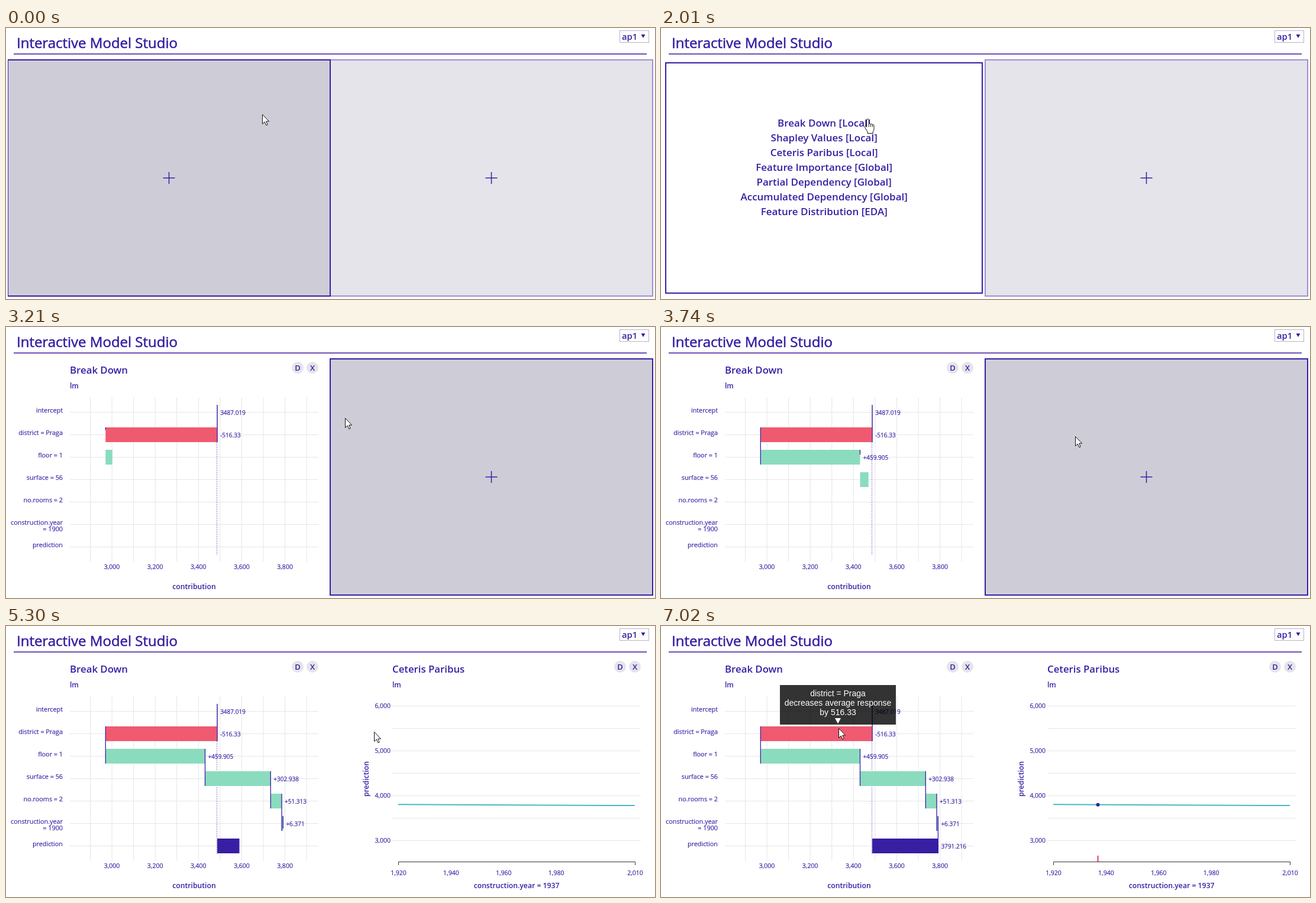
Recreate the animation shown at these times as an HTML page. Size 1097 by 459 pixels, loop 8 s.

```html
<!DOCTYPE html>
<html lang="en">
<head>
<meta charset="utf-8">
<title>Interactive Model Studio</title>
<style>
  html, body { margin: 0; width: 100%; height: 100%; overflow: hidden; background: #fff; }
  svg { display: block; width: 1097px; height: 459px; }
  text { font-family: "Open Sans", "Noto Sans", sans-serif; fill: #371ea3; white-space: pre; }
  .head { font-size: 24px; font-weight: 400; stroke: #371ea3; stroke-width: .55px; }
  .menu { font-size: 17px; font-weight: 600; text-anchor: middle; }
  .title { font-size: 16.8px; font-weight: 600; }
  .sub { font-size: 12px; font-weight: 600; }
  .axis { font-size: 12.2px; font-weight: 600; text-anchor: middle; }
  .btn { font-size: 13px; font-weight: 600; text-anchor: middle; }
  .select { font-size: 14.8px; font-weight: 600; }
  .label, .value, .tick { stroke: #371ea3; stroke-width: .15px; }
  .label { font-size: 10.8px; text-anchor: end; }
  .value { font-size: 10px; }
  .tick { font-size: 10.5px; text-anchor: middle; }
  .ytick { text-anchor: end; }
  .tip { font: 14px "Liberation Sans", Arial, sans-serif; fill: #fff; text-anchor: middle; }
</style>
</head>
<body>
<svg id="stage" viewBox="0 0 1097 459"></svg>
<script>
const LOOP = 8000, STEP = 500, BARS_AT = 2082;
const INK = '#371ea3', GREEN = '#8bdcbe', RED = '#f05a71', GRID = '#e6e6e8';
const stage = document.getElementById('stage');

function add(parent, tag, attrs = {}, text) {
  const el = document.createElementNS('http://www.w3.org/2000/svg', tag);
  for (const k in attrs) el.setAttribute(k, attrs[k]);
  if (text !== undefined) el.textContent = text;
  parent.appendChild(el);
  return el;
}
const set = (el, attrs) => { for (const k in attrs) el.setAttribute(k, attrs[k]); };
const show = (el, on) => { el.style.display = on ? '' : 'none'; };
const group = (parent = stage) => add(parent, 'g');
const label = (g, cls, x, y, s) => add(g, 'text', { class: cls, x, y }, s);
const line = (g, x1, y1, x2, y2, stroke, w = 1) =>
  add(g, 'line', { x1, y1, x2, y2, stroke, 'stroke-width': w });
const box = (g, x, y, width, height, fill, stroke = 'none') =>
  add(g, 'rect', { x, y, width, height, fill, stroke, 'stroke-width': 2 });

const clamp = v => Math.max(0, Math.min(1, v));
const cubic = v => (v = clamp(v)) < .5 ? 4 * v ** 3 : 1 - 4 * (1 - v) ** 3;
const smooth = v => v * v * (3 - 2 * v);

// Header
label(stage, 'head', 18, 34, 'Interactive Model Studio');
line(stage, 13, 44, 1083, 44, '#6e50b2', 2);
add(stage, 'rect', { x: 1037.5, y: 4.5, width: 49, height: 20, fill: '#fff', stroke: '#b9b3c6' });
label(stage, 'select', 1041, 20, 'ap1');
add(stage, 'path', { d: 'M1073.5 11h7l-3.5 6z', fill: INK });

// Empty panels
function emptyPanel(x, width) {
  const g = group();
  const rect = box(g, x, 54, width, 400);
  const cx = x + width / 2;
  line(g, cx - 10, 254, cx + 10, 254, INK, 1.5);
  line(g, cx, 244, cx, 264, INK, 1.5);
  return { g, hover: on => set(rect, { fill: on ? '#cecdd7' : '#e4e4ea', stroke: on ? INK : '#9c8fd2' }) };
}
const rightEmpty = emptyPanel(548, 545);
const leftEmpty = emptyPanel(3, 545);
add(add(stage, 'clipPath', { id: 'edge' }), 'rect', { x: 3, y: 50, width: 550, height: 409 });
set(leftEmpty.g, { 'clip-path': 'url(#edge)' });
leftEmpty.hover(true);

// Plot menus
const plots = ['Break Down [Local]', 'Shapley Values [Local]', 'Ceteris Paribus [Local]',
  'Feature Importance [Global]', 'Partial Dependency [Global]',
  'Accumulated Dependency [Global]', 'Feature Distribution [EDA]'];

function menu(x, y, items) {
  const g = group();
  box(g, x, 59, 535, 390, '#fff', INK);
  items.forEach((s, i) => label(g, 'menu', x + 267.7, y + 25 * i, s));
  return g;
}
const leftMenu = menu(8, 167, plots);
const rightMenu = menu(553, 179, plots.slice(1));

function chart(x, title) {
  const g = group();
  label(g, 'title', x, 79, title);
  label(g, 'sub', x, 104, 'lm');
  [['D', 385], ['X', 410]].forEach(([s, dx]) => {
    add(g, 'circle', { cx: x + dx, cy: 69, r: 10, fill: '#e4e4ea' });
    label(g, 'btn', x + dx, 73.8, s);
  });
  return g;
}

// Break Down chart
const breakDown = chart(108, 'Break Down');
const scaleX = v => 179 + (v - 3000) * .36575;
const rowY = i => 132 + 38 * i;
for (let i = 0; i < 11; i++) {
  const x = 142.5 + 36.57 * i;
  line(breakDown, x, 119, x, 398, GRID);
}
const rows = [
  ['intercept', 3487.019, 3487.019, '3487.019'],
  ['district = Praga', 3487.019, 2970.689, '-516.33'],
  ['floor = 1', 2970.689, 3430.594, '+459.905'],
  ['surface = 56', 3430.594, 3733.532, '+302.938'],
  ['no.rooms = 2', 3733.532, 3784.845, '+51.313'],
  ['construction.year', 3784.845, 3791.216, '+6.371'],
  ['prediction', 3487.019, 3791.216, '3791.216']
];
rows.forEach(([name], i) => {
  line(breakDown, 108, rowY(i) + 12.5, 528, rowY(i) + 12.5, GRID);
  label(breakDown, 'label', 96, rowY(i) + 13, name);
});
label(breakDown, 'label', 96, 346, '= 1900');
for (let v = 3000; v <= 3800; v += 200)
  label(breakDown, 'tick', scaleX(v), 410, v.toLocaleString('en-US'));
label(breakDown, 'axis', 318, 444, 'contribution');
set(line(breakDown, 356.5, 132, 356.5, 385, INK), { 'stroke-dasharray': '1 2' });

const bars = rows.map(([, from, to, text], i) => {
  const a = scaleX(from), b = scaleX(to), y = rowY(i);
  const fill = i === 6 ? INK : b < a ? RED : GREEN;
  return {
    a, b, y,
    rect: box(breakDown, a, y, 0, 25, fill),
    link: i < 6 && line(breakDown, b, y, b, y, INK, 1.3),
    value: label(breakDown, 'value', Math.max(a, b) + 5, y + 17, text)
  };
});
// Connectors sit above every bar.
bars.forEach(({ link }) => link && breakDown.appendChild(link));

function drawBars(t) {
  bars.forEach(({ a, b, y, rect, link, value }, i) => {
    const at = (t - BARS_AT) / STEP - i;
    const end = a + (b - a) * cubic(at);
    set(rect, { x: Math.min(a, end), width: Math.abs(end - a) });
    if (link) {
      show(link, at > 1);
      set(link, { y2: y + 63 * cubic(at - 1) });
    }
    show(value, at > 1);
  });
}

// Ceteris Paribus chart
const ceteris = chart(653, 'Ceteris Paribus');
for (let i = 0; i < 7; i++) {
  const y = 135.5 + 38 * i;
  line(ceteris, 653, y, 1073, y, GRID);
  if (i % 2 === 0)
    label(ceteris, 'tick ytick', 650, y + 3.5, (6000 - 500 * i).toLocaleString('en-US'));
}
add(ceteris, 'path', { d: 'M663.5 405v-5.5h400v5.5', fill: 'none', stroke: '#33313d' });
[1920, 1940, 1960, 1980, 2010].forEach(v =>
  label(ceteris, 'tick', 663.5 + (v - 1920) * 4.444, 422, v.toLocaleString('en-US')));
label(ceteris, 'axis', 863, 444, 'construction.year = 1937');
set(label(ceteris, 'axis', 0, 0, 'prediction'), { transform: 'translate(613 259) rotate(-90)' });
const rug = line(ceteris, 738.5, 389, 738.5, 399, RED, 2.5);
const profile = line(ceteris, 663, 302.3, 663, 302.3, '#46bac2', 2);
const dot = add(ceteris, 'circle', { cx: 738.5, cy: 302.7, fill: INK });

function drawProfile(t) {
  const p = cubic((t - 4830) / STEP);
  set(profile, { x2: 663 + 400 * p, y2: 302.3 + 1.8 * p });
  show(rug, t >= 5330);
  set(dot, { r: 3 * cubic((t - 5500) / 300) });
}

// Tooltip
const tip = group();
box(tip, -98, 0, 196, 67, 'rgba(0,0,0,.8)');
['district = Praga', 'decreases average response', 'by 516.33'].forEach((s, i) =>
  label(tip, 'tip', 0, 19 + 16 * i, s));
add(tip, 'path', { d: 'M-5 56h10l-5 9.5z', fill: '#fff' });

// Pointer
const pointer = group();
const arrow = add(pointer, 'path', {
  d: 'M.5 .5V16.5L4.2 13L6.8 18.8L9.2 17.8L6.7 12.1H11.6Z',
  fill: '#fff', stroke: '#111'
});
const hand = add(pointer, 'path', {
  d: 'M-2.5 14V1.9a1.9 1.9 0 0 1 3.8 0V8.5a1.8 1.6 0 0 1 3.2 .5a1.8 1.6 0 0 1 3 .8a1.5 1.6 0 0 1 2.5 1.3V17q0 3-1.8 4.8V24.5H-.8V22L-5.3 14.6q-1.2-2.6 .6-3.1q1.2 0 2.2 2.5zM1.3 8.5v5M4.5 9.2v4.3M7.5 10v3.5',
  fill: '#fff', stroke: '#111'
});

// time, x, y
const path = [
  [0, 433, 146], [190, 433, 146], [880, 443, 152], [1010, 443, 152],
  [1560, 343, 150], [1700, 350, 154], [2260, 350, 154], [2980, 573, 154],
  [3300, 573, 154], [3750, 700, 185], [3960, 700, 185], [4680, 736, 192],
  [4830, 736, 192], [5920, 473, 163], [6330, 371, 88], [7010, 300, 173], [LOOP, 300, 173]
];
function pointerAt(t) {
  const i = Math.max(1, path.findIndex(p => p[0] > t));
  const [t0, x0, y0] = path[i - 1], [t1, x1, y1] = path[i];
  const raw = (t - t0) / (t1 - t0);
  const p = t0 >= 4830 ? raw : smooth(raw);
  return [x0 + (x1 - x0) * p, y0 + (y1 - y0) * p];
}

function draw(t) {
  const [x, y] = pointerAt(t);
  show(leftEmpty.g, t < 1930);
  show(leftMenu, t >= 1930 && t < 2100);
  show(breakDown, t >= 2100);
  show(rightEmpty.g, t < 3760);
  show(rightMenu, t >= 3760 && t < 4800);
  show(ceteris, t >= 4800);
  rightEmpty.hover(t > 2100 && x > 548);
  drawBars(t);
  drawProfile(t);

  const linked = (t >= 2010 && t < 2100) || (t >= 3960 && t < 4800 && x > 728);
  show(hand, linked);
  show(arrow, !linked);
  set(pointer, { transform: `translate(${Math.round(x)} ${Math.round(y)})` });

  show(tip, t > 6340 && y >= 170);
  set(tip, { transform: `translate(299 ${Math.round(y) - 73})` });
}

function frame() {
  draw(performance.now() % LOOP);
  requestAnimationFrame(frame);
}
frame();
</script>
</body>
</html>
```
